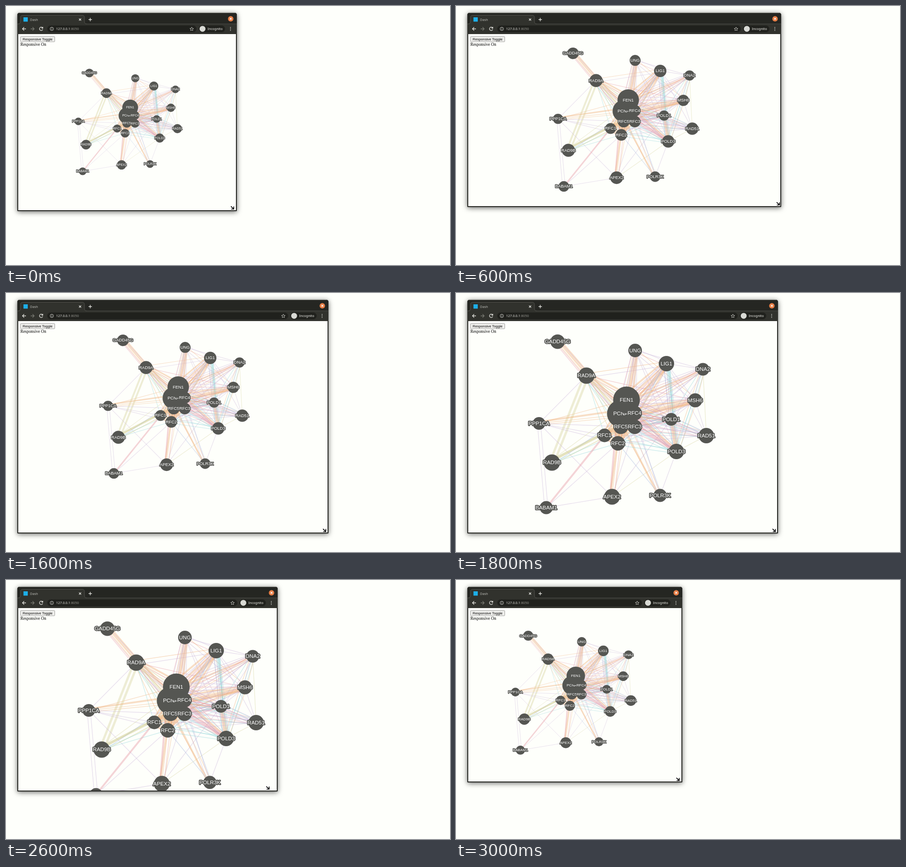
Write an HTML page that moves like this. It is 979 by 572 pixels and loops after 4.6 s.

```html
<!DOCTYPE html>
<html lang="en">
<head>
<meta charset="utf-8">
<title>Responsive graph</title>
<style>
  html, body { margin: 0; width: 100%; height: 100%; overflow: hidden; background: #fefffb; }
  body { position: relative; }
  svg, div { position: absolute; }
  #win { left: 25px; top: 15px; overflow: hidden; background: #000; border-radius: 5px 5px 2px 2px;
    box-shadow: 0 0 1px rgba(0, 0, 0, .6), 0 2px 12px rgba(0, 0, 0, .6); }
  #frame { left: 0; top: 0; background: linear-gradient(#555650 1px, #252622 1px 24px, #494a45 24px 25px, #31322d 25px 47px, #252622 47px); }
  #url { left: 66px; right: 89px; top: 28px; height: 15px; border-radius: 8px; background: #20211d; }
  #page { left: 2px; right: 2px; top: 47px; bottom: 2px; overflow: hidden; background: #fefffb; }
  #tools { right: 0; top: 0; }
  #left { left: 0; top: 0; }
  .ui { font: 7.4px "Noto Sans", "Open Sans", sans-serif; }
  .icon { fill: none; stroke: #e4e4df; stroke-width: 1.3; }
  #graph text { font: 11.75px "Liberation Sans", Arial, sans-serif; text-anchor: middle; fill: #fff;
    stroke: #555652; stroke-width: 4px; stroke-linejoin: round; paint-order: stroke; }
  #graph circle { fill: #555652; }
  #edges { stroke-opacity: .42; fill: none; }
  #cursor { left: 0; top: 0; fill: none; }
</style>
</head>
<body>
<div id="win">
  <div id="frame">
    <div id="url"></div>
    <svg id="left" class="ui" width="200" height="47" viewBox="25 15 200 47">
      <path d="M27 40Q32 40 32 35V25.5Q32 20.5 37 20.5H168Q173 20.5 173 25.5V35Q173 40 178 40Z" fill="#31322d"/>
      <path d="M27 39.5Q32 39.5 32 35V25.5Q32 20.5 37 20.5H168Q173 20.5 173 25.5V35Q173 39.5 178 39.5" fill="none" stroke="#5d5e58" stroke-width=".8"/>
      <rect x="38.5" y="25" width="9.5" height="9.5" fill="#1caee8"/>
      <text x="53" y="32.6" fill="#bcbdb7">Dash</text>
      <path class="icon" d="M161 27.7l4.6 4.6M165.6 27.7l-4.6 4.6M182 30h7.4M185.7 26.3v7.4"/>
      <path class="icon" d="M44 50.5h-7.6M40 46.8l-3.7 3.7 3.7 3.7"/>
      <path class="icon" style="stroke:#777871" d="M54.5 50.5h7.6M58.5 46.8l3.7 3.7-3.7 3.7"/>
      <path class="icon" d="M80.6 48.4a3.7 3.7 0 1 0 .4 3.2M81.2 46.3v2.8h-2.9"/>
      <circle class="icon" cx="101" cy="50.5" r="3.7" style="stroke-width:.9"/>
      <path class="icon" d="M101 50v2.4M101 48.2v1" style="stroke-width:.9"/>
      <text x="110.5" y="53.2" fill="#e4e4df">127.0.0.1<tspan fill="#969790">:8050</tspan></text>
    </svg>
    <svg id="tools" class="ui" width="110" height="47" viewBox="-110 15 110 47">
      <circle cx="-13.5" cy="28.2" r="6" fill="#e67d45"/>
      <path class="icon" d="M-15.5 26.2l4 4M-11.5 26.2l-4 4" style="stroke:#fff"/>
      <path class="icon" d="M-99.5 46.7l1.2 2.6 2.8.3-2.1 1.9.6 2.8-2.5-1.4-2.5 1.4.6-2.8-2.1-1.9 2.8-.3Z" style="stroke-width:.8"/>
      <rect x="-84" y="43" width="58" height="15" rx="7.5" fill="#20211d"/>
      <circle cx="-75.7" cy="50.4" r="6.5" fill="#d9dad5"/>
      <text x="-64.5" y="53" fill="#f4f4ef">Incognito</text>
      <g fill="#e4e4df"><circle cx="-14" cy="47.4" r=".9"/><circle cx="-14" cy="50.6" r=".9"/><circle cx="-14" cy="53.8" r=".9"/></g>
    </svg>
    <div id="page">
      <svg width="952" height="510" viewBox="27 62 952 510">
        <rect x="32" y="67.5" width="75.5" height="11.5" rx="1.3" fill="#efefec" stroke="#777" stroke-width=".7"/>
        <text x="69.7" y="76" text-anchor="middle" style="font:7.8px 'Liberation Sans',Arial,sans-serif">Responsive Toggle</text>
        <text x="31.7" y="87.5" style="font:9.37px 'Liberation Serif',serif">Responsive On</text>
        <g id="graph"><g id="edges"></g><g id="nodes"></g></g>
      </svg>
    </div>
  </div>
</div>
<svg id="cursor" width="16" height="16" viewBox="-8 -8 16 16">
  <path d="M-3-3.2L3 2.8M-2.5 3H3.2V-2.7" stroke="#fff" stroke-width="3.2"/>
  <path d="M-3-3.2L3 2.8M-2.5 3H3.2V-2.7" stroke="#000" stroke-width="1.7"/>
</svg>
<script>
const LOOP = 4600;
const $ = id => document.getElementById(id);

// name: x, y, radius
const nodes = {
  PCNA: [363, 266.5, 30], FEN1: [376, 236, 29.5], GADD45G: [224, 107.5, 16], RAD9A: [287.5, 182.5, 18],
  UNG: [395, 127, 15], LIG1: [464, 156, 17], DNA2: [544.5, 168.5, 14], MSH6: [527.5, 237, 15.5],
  RFC5: [363.5, 295, 16.5], RFC4: [393.5, 265.5, 16.5], RFC3: [394, 295.5, 16], RFC1: [327.5, 314.5, 15],
  RFC2: [357, 332, 16], POLD1: [474.5, 279, 14], POLD3: [486, 350, 17], RAD51: [552, 315, 17],
  PPP1CA: [183, 288, 14], RAD9B: [211.5, 374.5, 18], BABAM1: [199, 474, 14.5],
  APEX2: [344, 450, 17.5], POLR3K: [450, 447, 14.5]
};

const colors = { e: '#c9b3d8', l: '#a0b3dc', p: '#8fd3da', i: '#e59aa5', r: '#efb17c', s: '#d6d3a0' };

// One letter per line between two nodes; capitals are thick.
const links = `
GADD45G: RAD9A RRri, PCNA ei
RAD9A: RAD9B SS, PPP1CA e, LIG1 re, FEN1 Rrsei, PCNA RrSep, RFC4 srie, RFC5 srp, RFC3 sre, RFC1 p, RFC2 sr, POLD1 i, MSH6 i
PPP1CA: PCNA Rr, FEN1 r, RFC4 r, RFC1 e, RFC2 e, RFC5 e, APEX2 e, BABAM1 ee
RAD9B: RFC1 Ss, RFC5 Ss, PCNA sl, RFC2 p, RFC4 s, RFC3 p
BABAM1: RFC1 I, RFC2 e, APEX2 e
APEX2: PCNA Ii, FEN1 Rr, RFC2 r, POLD3 s, POLD1 e, RFC3 e
POLR3K: PCNA Rr, RFC4 e, RFC3 el, RFC5 r, RFC2 l, POLD3 e
UNG: FEN1 RiRre, PCNA Rei, RFC4 ee, RFC3 e, RFC5 e, LIG1 ei, DNA2 e, POLD3 e, POLD1 e, MSH6 re
LIG1: FEN1 RiReR, PCNA RRie, RFC4 Rel, RFC3 ep, RFC5 e, RFC2 e, POLD1 Ppe, POLD3 pPel, DNA2 e, MSH6 e, RAD51 e
DNA2: FEN1 rRie, PCNA reie, RFC4 ei, RFC3 e, RFC2 e, POLD3 ppr, POLD1 ep, RAD51 s, MSH6 re
MSH6: FEN1 rie, PCNA RRrRe, RFC4 Rre, RFC5 re, RFC3 ei, RFC1 r, RFC2 e, POLD1 e, POLD3 rp, RAD51 e
POLD1: PCNA iIer, FEN1 pei, RFC4 Rip, RFC5 Ie, RFC3 ipl, RFC1 p, RFC2 pe, POLD3 iRRp, RAD51 pei
POLD3: PCNA pIi, FEN1 pi, RFC4 iIRp, RFC3 pIi, RFC5 pie, RFC1 p, RFC2 pp, RAD51 s
RAD51: PCNA iep, FEN1 iee, RFC4 epei, RFC3 ie, RFC5 pe, RFC2 e, RFC1 e
RFC1: RFC2 RRR, PCNA RRr, RFC5 RRR, RFC4 R, RFC3 Rr, FEN1 r
RFC2: PCNA RRR, RFC5 RRR, RFC3 RRp, RFC4 RR, FEN1 r
RFC4: PCNA RR, FEN1 RR, RFC3 RR, RFC5 RR`;

// Parallel links spread evenly across the inner half of both nodes.
function edge(from, to, kind, spread) {
  const [x1, y1, r1] = nodes[from], [x2, y2, r2] = nodes[to];
  const length = Math.hypot(x2 - x1, y2 - y1);
  const nx = (y1 - y2) / length * spread, ny = (x2 - x1) / length * spread;
  const point = (x, y, r) => `${(x + nx * r / 2).toFixed(1)} ${(y + ny * r / 2).toFixed(1)}`;
  const type = kind.toLowerCase();
  const width = kind === type ? 1.4 : type === 's' ? 5 : 4;
  return `<path d="M${point(x1, y1, r1)}L${point(x2, y2, r2)}" stroke="${colors[type]}" stroke-width="${width}"/>`;
}

$('edges').innerHTML = links.trim().split('\n').map(line => {
  const [from, targets] = line.split(': ');
  return targets.split(', ').map(target => {
    const [to, kinds] = target.split(' ');
    return [...kinds].map((kind, i) => edge(from, to, kind, (2 * i + 1) / kinds.length - 1)).join('');
  }).join('');
}).join('');

$('nodes').innerHTML = Object.entries(nodes).map(([name, [x, y, r]]) =>
  `<circle cx="${x}" cy="${y}" r="${r}"/><text x="${x}" y="${y + 3.7}">${name}</text>`).join('');

// Graph fits: x, y, scale
const fits = {
  start: [51.2, 84.4, .592], wide: [78.2, 18.3, .802], tall: [0, 0, 1],
  nudged: [-.5, 0, 1], end: [4.7, 48.8, .69]
};

// time, window right and bottom, painted right and bottom, fit, cursor
const steps = [
  [0, 508.5, 452.5, 508.5, 452.5, 'start', 499, 445.5],
  [400, 565, 450, 540, 450, 'start', 571, 443],
  [500, 685, 445, 660, 445, 'start', 688, 439],
  [600, 716.5, 443.5, 716.5, 443.5, 'wide', 710, 436.5],
  [1400, 715, 479, 719.5, 445, 'wide', 709, 453],
  [1500, 713, 514, 715, 479, 'wide', 706, 505],
  [1600, 711, 531, 711, 531, 'wide', 702, 524],
  [1800, 710, 531, 710, 531, 'tall', 701, 524],
  [2100, 709, 531, 709, 531, 'nudged', 700, 524],
  [2500, 670, 505, 670, 505, 'nudged', 645, 494],
  [2600, 599, 467, 599, 467, 'nudged', 577, 459],
  [2700, 552, 461, 552, 461, 'nudged', 531, 452],
  [2800, 516, 457, 516, 457, 'nudged', 494, 446],
  [3000, 498.5, 447, 498.5, 447, 'end', 489, 440]
];

function resize(element, right, bottom) {
  element.style.width = right - 25 + 'px';
  element.style.height = bottom - 15 + 'px';
}

let current;
function draw(now) {
  const time = now % LOOP;
  const step = steps.findLast(s => s[0] <= time);
  if (step !== current) {
    current = step;
    const [, right, bottom, paintedRight, paintedBottom, fit, cx, cy] = step;
    const [x, y, scale] = fits[fit];
    resize($('win'), right, bottom);
    resize($('frame'), paintedRight, paintedBottom);
    $('graph').setAttribute('transform', `translate(${x} ${y}) scale(${scale})`);
    $('cursor').style.transform = `translate(${cx - 8}px, ${cy - 8}px)`;
  }
  requestAnimationFrame(draw);
}
draw(performance.now());
</script>
</body>
</html>
```
